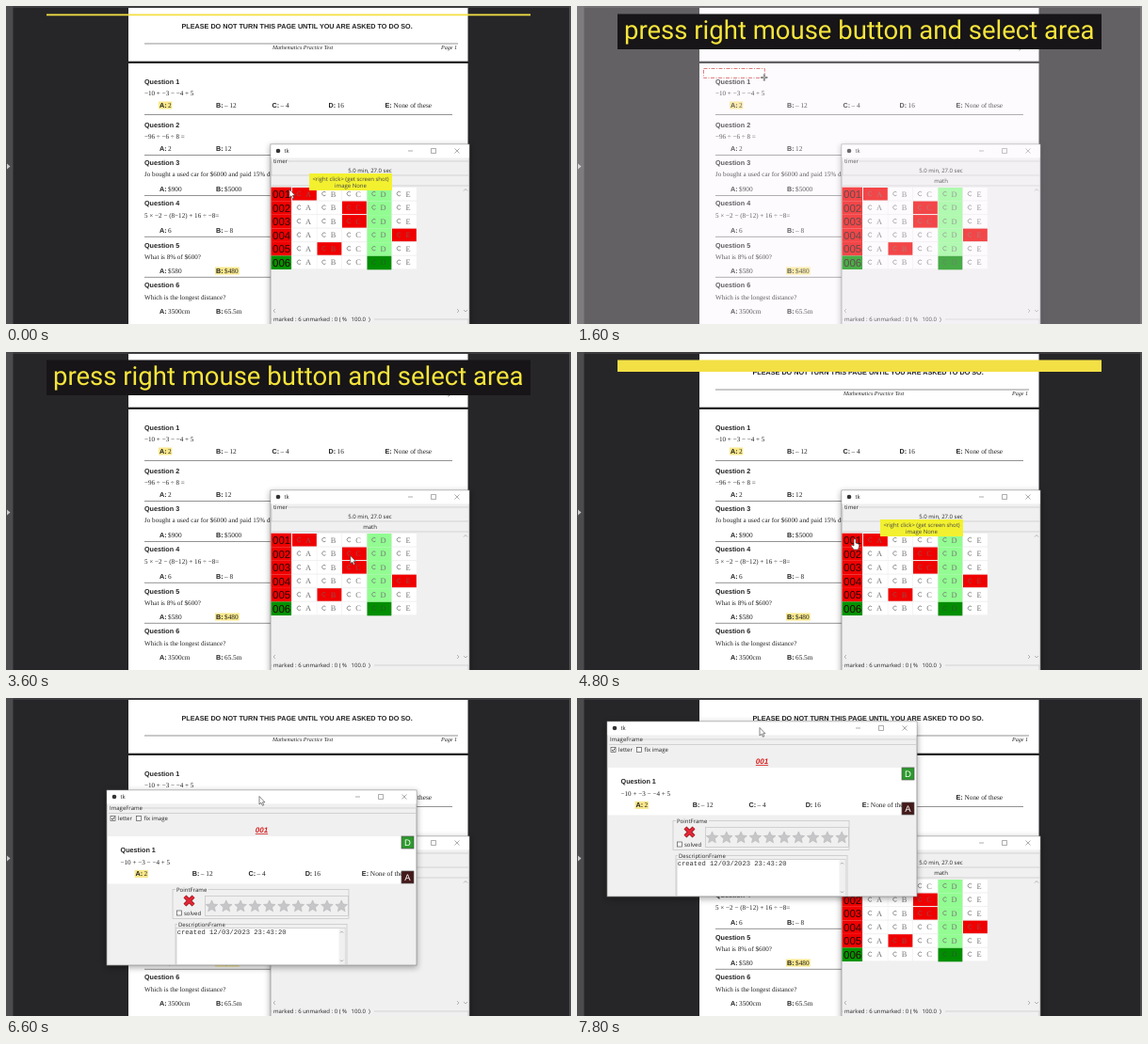
Write an HTML page that moves like this. It is 600 by 338 pixels and loops after 8 s.

```html
<!DOCTYPE html>
<html lang="en">
<head>
<meta charset="utf-8">
<title>Marking sheet demo</title>
<style>
  html, body { margin: 0; width: 100%; height: 100%; overflow: hidden; background: #262628; }
  svg { display: block; }
  #stage { width: 100%; height: 100%; }
  text { white-space: pre; text-rendering: geometricPrecision; }
  .bold { font-family: "Liberation Sans", sans-serif; font-weight: 700; }
  .sans { font-family: "Liberation Sans", sans-serif; }
  .serif { font-family: "Liberation Serif", serif; }
  .ital { font-family: "Liberation Serif", serif; font-style: italic; }
  .ui { font-family: "Open Sans", sans-serif; }
  .mono { font-family: "Liberation Mono", monospace; }
  .caption { font-family: Roboto, sans-serif; }
  .mid { text-anchor: middle; }
  .shadow { filter: blur(3px); opacity: .3; }
</style>
</head>
<body>
<svg id="stage" viewBox="0 0 600 338"></svg>
<script>
const STEP = 200, LOOP = 8000;
const INK = '#222', FACE = '#f0f0f0', LINE = '#c4c4c4', MARK = '#f9e88c';

const rect = (x, y, w, h, fill, more = '') =>
  `<rect x="${x}" y="${y}" width="${w}" height="${h}" fill="${fill}" ${more}/>`;
const box = (x, y, w, h, fill = 'none', stroke = LINE) =>
  rect(x, y, w, h, fill, `stroke="${stroke}" stroke-width=".7"`);
const path = (d, stroke, width = .7, fill = 'none') =>
  `<path d="${d}" fill="${fill}" stroke="${stroke}" stroke-width="${width}"/>`;
const text = (x, y, size, font, str, fill = INK, more = '') =>
  `<text x="${x}" y="${y}" font-size="${size}" class="${font}" fill="${fill}" ${more}>${str}</text>`;
const group = (id, body, more = '') => `<g id="${id}" ${more}>${body}</g>`;

// Worksheet
const CHOICE_X = [163, 223, 282.5, 342.5, 402.5];

function question(n, titleY, bodyY, answerY, body, answers, marked) {
  const choices = answers.map((answer, i) => {
    const x = CHOICE_X[i];
    const width = 10.5 + answer.length * 3.8;
    return (i === marked ? rect(x - 1, answerY - 6.5, width, 8, MARK) : '') +
      text(x, answerY, 7.2, 'bold', 'ABCDE'[i] + ':') +
      text(x + 9, answerY, 7.3, 'serif', answer);
  });
  return text(147, titleY, 7.2, 'bold', 'Question ' + n) +
    text(147, bodyY, 7.1, 'serif', body) + choices.join('');
}

const rule = (y, end = 474) => path(`M147 ${y}H${end}`, '#777', .8);

const worksheet =
  rect(0, 0, 600, 338, '#262628') + rect(0, 0, 600, 2, '#3c3c3e') +
  rect(0, 0, 7.5, 338, '#4c4c4e') + rect(598, 0, 2, 338, '#4c4c4e') +
  '<path d="M1 167.5L4.5 170.5 1 173.5Z" fill="#c8c8c8"/>' +
  rect(130, 2, 360.5, 56.7, '#fff') + rect(130, 61, 360.5, 277, '#fff') +
  text(186.5, 23.5, 7.23, 'bold', 'PLEASE DO NOT TURN THIS PAGE UNTIL YOU ARE ASKED TO DO SO.') +
  rule(40, 480) + text(283, 45.5, 6.06, 'ital', 'Mathematics Practice Test') +
  text(462, 45.5, 6.06, 'ital', 'Page 1') +
  group('first', question(1, 82.5, 95.3, 108, '−10 + −3 − −4 + 5',
    ['2', '– 12', '– 4', '16', 'None of these'], 0)) +
  question(2, 128.5, 141, 153.5, '−96 ÷ −6 ÷ 8 =', ['2', '12']) +
  question(3, 168.8, 181.3, 197, 'Jo bought a used car for $6000 and paid 15% deposit.', ['$900', '$5000']) +
  question(4, 212.3, 224.5, 241, '5 × −2 − (8−12) + 16 ÷ −8=', ['6', '– 8']) +
  question(5, 256.5, 269, 284, 'What is 8% of $600?', ['$580', '$480'], 1) +
  question(6, 299, 312, 327, 'Which is the longest distance?', ['3500cm', '65.5m']) +
  [115.5, 158.5, 201.5, 245.3, 288.3].map(y => rule(y)).join('');

// Windows
function frame(w, h) {
  const x = w - 62;
  return rect(-1, 1, w + 2, h + 2, '#000', 'class="shadow"') +
    box(0, 0, w, h, FACE, '#8c8c8c') + rect(.4, .4, w - .8, 14, '#fff') +
    '<circle cx="8" cy="7" r="2.3" fill="#333"/>' + text(14.5, 9.3, 6, 'ui', 'tk') +
    path(`M${x - 3} 7h5M${x + 21.5} 4.5h5v5h-5zM${x + 46.5} 4.5l5 5m0-5l-5 5`, '#777', .6);
}

const CELL_X = [304, 330.5, 357, 383.5, 410];
const ROW_H = 14.55;

function answerRow(chosen, row) {
  const y = 193 + row * ROW_H, right = chosen === 3;
  const label = rect(281.5, y - .3, 21.5, ROW_H, right ? '#009400' : '#f00000') +
    text(283, y + 11, 11.5, 'sans', '00' + (row + 1), '#2a0505');
  return label + CELL_X.map((x, i) => {
    const hit = i === chosen;
    const fill = i === 3 ? (hit ? '#008e00' : '#92fc92') : (hit ? '#f00000' : '#fff');
    const ink = hit ? (right ? '#2c5c2c' : '#9a4a4a') : '#777';
    return rect(x, y, 25.8, i === 3 ? ROW_H : 13.5, fill) +
      path(`M${x + 9} ${y + 5}a2.2 2.2 0 1 0 0 3`, ink, .8) +
      text(x + 17, y + 9.5, 8.4, 'serif mid', 'ABCDE'[i], ink);
  }).join('');
}

const sheet =
  `<g transform="translate(281 147)">${frame(211, 200)}</g>` +
  path('M299 165H491M282 180H491M282 191H491M282 165V180', LINE) +
  text(284, 167.3, 6, 'ui', 'timer') +
  text(386.5, 177, 6, 'ui mid', '5.0 min, 27.0 sec') +
  text(386.5, 188, 6, 'ui mid', 'math') +
  [0, 2, 2, 4, 1, 3].map(answerRow).join('') +
  path('M486 196.5l2-2 2 2M486 323l2 2 2-2M286 322l-2 2 2 2M479 322l2 2-2 2', '#999') +
  path('M391 333H491V338M281 333h2', LINE) +
  text(284, 335.3, 6, 'ui', 'marked : 6 unmarked : 0 ( %   100.0  )');

const tooltip = rect(322, 178, 88, 18, '#f3f12f') +
  text(366, 186, 6, 'ui mid', '&lt;right click&gt; (get screen shot)', '#444') +
  text(366, 193.3, 6, 'ui mid', 'image None', '#444');

const check = (x, y, on) => box(x, y, 5, 5, '#fff', '#555') +
  (on ? path(`M${x + 1} ${y + 2.5}l1.3 1.4 2-3`, '#222', .8) : '');

const badge = (x, y, letter, fill) => box(x, y, 13, 13, fill, '#555') +
  text(x + 6.5, y + 10, 9.5, 'sans mid', letter, '#fff');

function star(cx, cy) {
  const points = Array.from({ length: 10 }, (_, i) => {
    const a = i * Math.PI / 5 - Math.PI / 2, r = i % 2 ? 3.1 : 6.6;
    return `${(cx + r * Math.cos(a)).toFixed(1)},${(cy + r * Math.sin(a)).toFixed(1)}`;
  });
  return `<polygon points="${points.join(' ')}" fill="#c6c6c8" stroke="#b0b0b2" stroke-width=".5"/>`;
}

const stars = Array.from({ length: 10 }, (_, i) => star(44.5 + i * 15.3, 227)).join('');

const details =
  box(3, 209, 187, 31) + rect(6, 206, 35, 6, FACE) + text(7, 211.3, 6, 'ui', 'PointFrame') +
  path('M16 216.5l9 9m0-9l-9 9', '#7c1118', 4.2) + path('M16 216.5l9 9m0-9l-9 9', '#e32636', 3) +
  check(7.5, 231.5, false) + text(15, 236.3, 6, 'ui', 'solved') +
  box(37.5, 216, 152, 21) + stars +
  box(6, 246, 182, 60) + rect(8, 243, 51, 6, FACE) + text(9, 248, 6, 'ui', 'DescriptionFrame') +
  box(7, 250, 179, 39, '#fff') + rect(179.5, 250.4, 6, 38, FACE) +
  path('M181 255l1.5-1.5 1.5 1.5M181 284l1.5 1.5 1.5-1.5', '#888') +
  text(7.7, 256.3, 7.16, 'mono', 'created 12/03/2023 23:43:20', '#333');

function dialog(id, w, h, imageH, fixed, dx, dy) {
  return group(id, `<clipPath id="${id}Clip">${rect(-2, -2, w + 4, h + 2, '#000')}</clipPath>` +
    frame(w, h) + path(`M36 19H${w - 1}M2 24.5H${w - 1}`, LINE) +
    text(3, 21.3, 6, 'ui', 'ImageFrame') +
    check(4, 27.5, true) + text(12, 32.3, 6, 'ui', 'letter') +
    check(31.5, 27.5, fixed) + text(39.5, 32.3, 6, 'ui', 'fix image') +
    text(w / 2, 45, 8, 'bold mid', '001', '#d81e1e', 'font-style="italic" text-decoration="underline"') +
    rect(1, 49, w - 2, imageH, '#fff') +
    `<svg x="1.5" y="49" width="${w - 4}" height="${imageH}" viewBox="134 66 324 50"
      preserveAspectRatio="none"><use href="#first"/></svg>` +
    badge(w - 16, 49, 'D', '#2c9a2c') + badge(w - 16, 35.5 + imageH, 'A', '#451a1a') +
    `<g clip-path="url(#${id}Clip)"><g transform="translate(${dx} ${dy})">${details}</g></g>`);
}

// Pointers
const arrow = path('M0 0V8.5L2 6.8 3.4 9.8 4.8 9.2 3.4 6.3H6Z', '#333', .6, '#fff');
const hand = path('M-1 -4Q0 -5 1 -4V0L4 1Q5 2 4.5 4L3.5 7H-1L-4 3Q-4 1 -1 3Z', '#333', .6, '#fff');
const cross = path('M-3.5 0H3.5M0 -3.5V3.5', '#666', 2) + path('M-3 0H3M0 -3V3', '#ddd', .7);

const stage = document.getElementById('stage');
stage.innerHTML = worksheet + sheet + group('tooltip', tooltip) +
  group('dialog', dialog('tall', 195, 290, 155, true, 0, 0) + dialog('wide', 329, 186, 50.5, false, 67, -103.5)) +
  group('selecting', '<path id="veil" fill="#f6eff8" fill-opacity=".29" fill-rule="evenodd"/>' +
    '<rect id="marquee" x="134.5" y="66.5" fill="none" stroke="#e07c7c" stroke-dasharray="4 1.5 1 1.5"/>') +
  group('pointer', group('arrow', arrow) + group('hand', hand) + group('cross', cross)) +
  '<rect id="bar" x="43" y="8.5" width="514"/>' +
  text(50, 34.7, 27.5, 'caption', 'press right mouse button and select area', '#f6e53c', 'id="caption"');

// Motion: tracks are [time, ...values]
const pointerTrack = [[0, 301, 195], [200, 301, 195], [600, 213, 156], [1200, 134, 66], [1400, 134, 66],
  [2400, 458, 115.5], [3000, 458, 115.5], [3800, 335, 250], [4400, 295, 203], [5000, 295, 203],
  [5600, 130, 46], [5800, 124, 41], [6000, 124, 41]];
const windowTrack = [[6000, 83, 16], [6200, 83, 16], [6600, 107, 98], [7000, 17, 27.5],
  [7400, 107, 94], [7800, 32, 25]];
const barTrack = [[0, 1.8], [200, 20], [400, 37.5], [4600, 37.5], [4800, 12.5], [5000, 0]];

function at(track, t) {
  const next = track.findIndex(key => key[0] > t);
  if (next < 0) return track[track.length - 1].slice(1);
  if (next === 0) return track[0].slice(1);
  const a = track[next - 1], b = track[next], k = (t - a[0]) / (b[0] - a[0]);
  return a.slice(1).map((v, i) => v + (b[i + 1] - v) * k);
}

const el = id => document.getElementById(id);
const set = (id, attrs) => { for (const name in attrs) el(id).setAttribute(name, attrs[name]); };
const show = (id, on) => set(id, { display: on ? 'inline' : 'none' });
const move = (id, [x, y]) => set(id, { transform: `translate(${x} ${y})` });
const within = (t, from, to) => t >= from && t < to;

function draw(t) {
  const selecting = within(t, 400, 3000), pointing = within(t, 4400, 5200);
  const corner = at(windowTrack, t);
  const pointer = t < 6200 ? at(pointerTrack, t) : [corner[0] + 162, corner[1] + 6.5];

  show('tooltip', t < 400 || pointing);
  show('dialog', t >= 5200);
  show('tall', t < 6000);
  show('wide', t >= 6000);
  move('dialog', corner);

  move('pointer', pointer);
  show('cross', selecting);
  show('hand', pointing);
  show('arrow', !selecting && !pointing);

  const dragging = selecting && t >= 1400;
  const w = dragging ? pointer[0] - 134 : 0, h = dragging ? pointer[1] - 66 : 0;
  show('selecting', selecting);
  show('marquee', w > 0);
  set('marquee', { width: w, height: h });
  set('veil', { d: `M0 0H600V338H0ZM134 66h${w}v${h}h${-w}Z` });

  const captioned = within(t, 600, 4600);
  set('bar', { height: at(barTrack, t)[0], fill: captioned ? '#171517' : '#f3e044' });
  show('caption', captioned);
}

function tick() {
  draw(Math.floor(performance.now() % LOOP / STEP) * STEP);
  requestAnimationFrame(tick);
}
tick();
</script>
</body>
</html>
```
